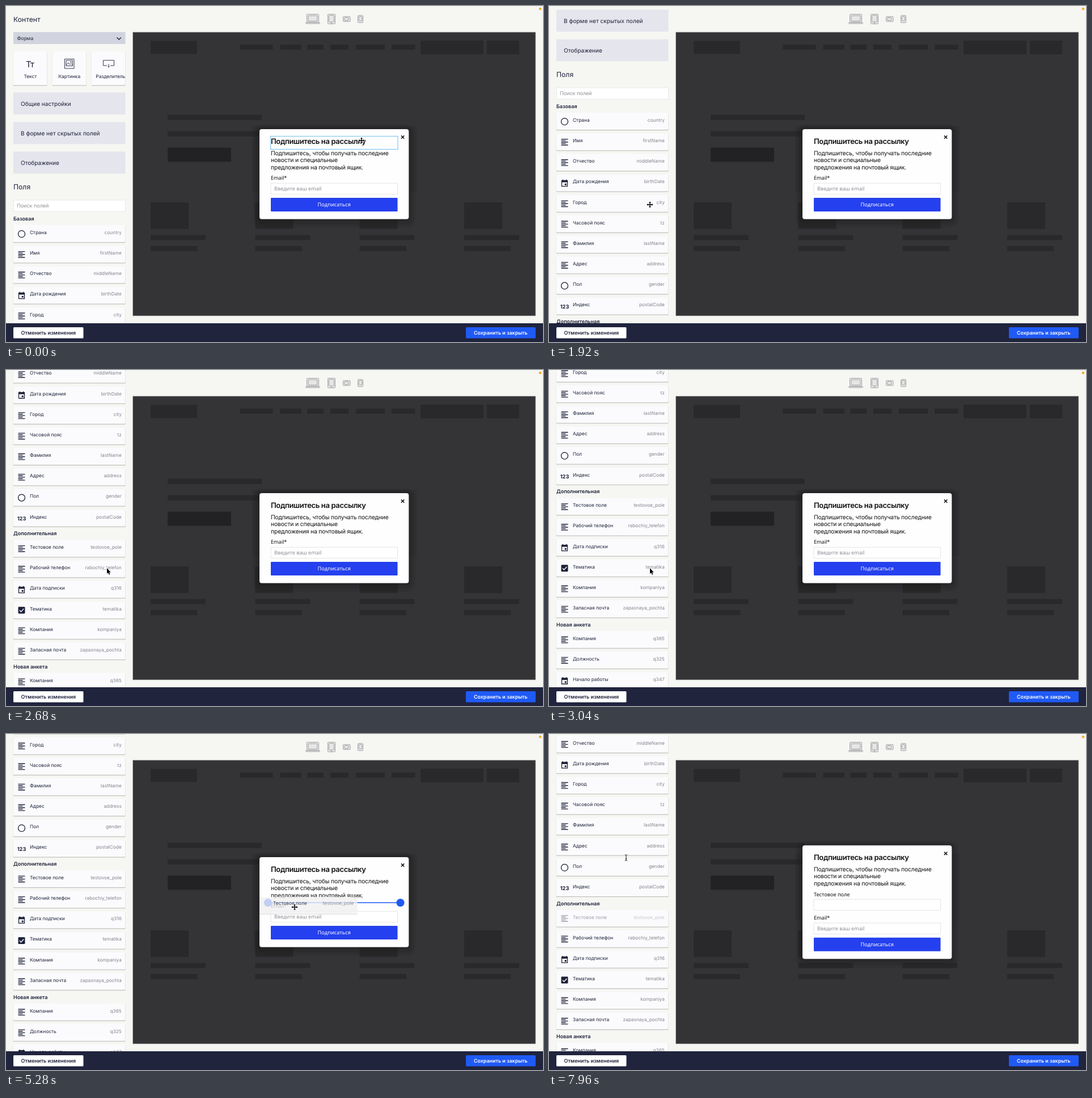
Animation of 947 by 592 pixels, one loop 8 s. Source, as an HTML page:

```html
<!DOCTYPE html>
<html lang="ru">
<head>
<meta charset="utf-8">
<style>
  html, body { margin: 0; width: 100%; height: 100%; overflow: hidden; background: #f6f6f3; }
  svg { display: block; width: 947px; height: 592px; font-family: Inter, "Noto Sans", sans-serif; text-rendering: geometricPrecision; }
  .noto { font-family: "Noto Sans", "Open Sans", sans-serif; }
</style>
</head>
<body>
<svg id="stage" viewBox="0 0 947 592" xmlns="http://www.w3.org/2000/svg"></svg>
<script>
const LOOP = 8000, STEP = 40, INK = '#1d2138';
const stage = document.getElementById('stage');

const rect = (x, y, w, h, fill, extra = '') =>
  `<rect x="${x}" y="${y}" width="${w}" height="${h}" fill="${fill}" ${extra}/>`;
const text = (x, y, size, str, fill = INK, extra = '') =>
  `<text x="${x}" y="${y}" font-size="${size}" fill="${fill}" ${extra}>${str}</text>`;
const line = (d, color = INK, width = 1.3, extra = '') =>
  `<path d="${d}" fill="none" stroke="${color}" stroke-width="${width}" ${extra}/>`;
const group = (id, body, extra = '') => `<g id="${id}" ${extra}>${body}</g>`;
const middle = 'text-anchor="middle"', end = 'text-anchor="end"', semi = 'font-weight="600"';

const panel = (x, y, w, h) =>
  rect(x - .5, y + .2, w + 1, h + 1.4, '#000', 'opacity=".07" rx="1.5"') +
  rect(x, y + 1, w, h, '#000', 'opacity=".17" rx="1"') +
  rect(x, y, w, h, '#fbfbfd', 'rx="1"');

// Field icons, centred on the origin
const icons = {
  lines: line('M-6-5.2H6M-6-2.6H2M-6 0H6M-6 2.6H2M-6 5.2H6', INK, 1.35),
  ring: `<circle r="6" fill="none" stroke="${INK}" stroke-width="1.3"/>`,
  date: line('M-5-4.5H5V5.5H-5Z', INK, 1.3) + rect(-5.5, -5.2, 11, 3.6, INK) +
        rect(-3.8, -6.5, 1.4, 2, INK) + rect(2.4, -6.5, 1.4, 2, INK) + rect(.2, .7, 3, 3, INK),
  check: rect(-6, -6, 12, 12, INK, 'rx="1.4"') + line('M-3.6 0L-1 2.7L3.8-2.6', '#fff', 1.4),
  digits: text(0, 3.8, 9.2, '123', INK, middle + ' font-weight="700"')
};

const sections = [
  ['Базовая', 374.8, [
    ['Страна', 'country', 'ring'], ['Имя', 'firstName'], ['Отчество', 'middleName'],
    ['Дата рождения', 'birthDate', 'date'], ['Город', 'city'], ['Часовой пояс', 'tz'],
    ['Фамилия', 'lastName'], ['Адрес', 'address'], ['Пол', 'gender', 'ring'],
    ['Индекс', 'postalCode', 'digits']]],
  ['Дополнительная', 753.8, [
    ['Тестовое поле', 'testovoe_pole'], ['Рабочий телефон', 'rabochiy_telefon'],
    ['Дата подписки', 'q316', 'date'], ['Тематика', 'tematika', 'check'],
    ['Компания', 'kompaniya'], ['Запасная почта', 'zapasnaya_pochta']]],
  ['Новая анкета', 988.4, [
    ['Компания', 'q365'], ['Должность', 'q325'], ['Начало работы', 'q347', 'date']]]
];

function fieldCard([name, code, icon = 'lines'], y) {
  const body = text(42, y + 3, 8.4, name) + text(203.8, y + 3, 8.3, code, '#83858f', end) +
    `<g transform="translate(27.5 ${y + 2.6})">${icons[icon]}</g>`;
  const id = code === 'testovoe_pole' ? 'id="usedField"' : '';
  return panel(13, y - 13, 197.5, 30) + `<g ${id}>${body}</g>`;
}

function sidebar() {
  const tiles = [13, 82, 151].map((x, i) => panel(x, 80, 59.5, 59.5) +
    text(x + (i === 2 ? 33.3 : 29.8), 127, 8.4, ['Текст', 'Картинка', 'Разделитель'][i], INK, middle)).join('');
  const tabs = ['Общие настройки', 'В форме нет скрытых полей', 'Отображение'].map((s, i) =>
    rect(13, 152.5 + i * 52, 197.5, 38.7, '#e5e5ed') + text(26, 175.8 + i * 52, 10.1, s)).join('');
  const fields = sections.map(([title, y, list]) => text(13, y + 3.2, 9, title, INK, semi) +
    list.map((f, i) => fieldCard(f, y + 24.2 + i * 36.16)).join('')).join('');
  return text(13, 27.6, 12.2, 'Контент') +
    rect(13, 46, 197.5, 21, '#d1d4de') + text(19.5, 59.8, 8.5, 'Форма') +
    line('M195.5 55.4l3.7 3.7l3.7-3.7', INK, 1.4) + tiles +
    text(42.5, 107.5, 15, 'Тт', INK, middle) +
    line('M103.5 93.5h16.5v16.5h-16.5ZM106 96h11.5v9.5H106ZM106.5 104l3.3-4l3 3l2-1.6l2.7 2.6', INK, .9) +
    `<circle cx="114.6" cy="98.8" r="1" fill="${INK}"/>` +
    line('M178 105h-6.5V95.7h19V105H184M181 102v6M179.5 106.5l1.5 1.5l1.5-1.5', INK, .9) +
    tabs + text(13, 323.2, 12.2, 'Поля') +
    rect(13.5, 342, 197, 20, '#fff', 'stroke="#e4e4e6" stroke-width=".8"') +
    text(19, 355.2, 9, 'Поиск полей', '#8e8f96') + fields;
}

function canvas() {
  const dim = (x, y, w, h, c = '#29292b') => rect(x, y, w, h, c);
  const nav = [[412.5, 58], [483.5, 37.5], [531.5, 28.5], [572, 32], [617, 51], [680, 41.5]];
  const columns = [255, 439.5, 623.5, 808];
  return rect(223.5, 46, 710.5, 500, '#343436', 'stroke="#b9c4bb" stroke-width=".8"') +
    dim(255, 61.5, 82, 23) + nav.map(([x, w]) => dim(x, 68, w, 9)).join('') +
    dim(731, 61, 111, 24) + dim(848, 61, 57, 24) +
    dim(434, 211, 291, 117, '#313133') +
    dim(285, 191.5, 166, 9.5) + dim(285, 220.5, 166, 9.5) + dim(285, 249.5, 112, 25, '#222224') +
    columns.map(x => dim(x, 346, 67, 47) + dim(x, 403.5, 96.7, 9) + dim(x, 423, 82.3, 9)).join('');
}

function devices() {
  const box = (x, y, w, h) => rect(x, y, w, h, '#e6e6e6', 'stroke="#a3a3a5" stroke-width="1" rx="1"');
  return box(530.5, 14.5, 21, 14) + box(533, 17, 16, 9.5) + box(528.5, 29, 25, 2) +
    box(567.5, 14.5, 13, 17) + box(569.5, 16.5, 9, 11.5) + rect(573, 29.2, 2, 1.4, '#a3a3a5') +
    box(594.5, 18.7, 12.5, 8.6) + box(596.8, 20.5, 7, 5) +
    box(620.5, 16.7, 9, 12.6) + box(622.3, 18.5, 5.4, 7.6);
}

function popup() {
  const label = (y, s) => text(467, y, 9.1, s, '#111', 'class="noto"');
  const input = y => rect(467, y, 223.5, 19.3, '#fff', 'stroke="#e5e5e8" stroke-width="1"');
  const lines = ['Подпишитесь, чтобы получать последние', 'новости и специальные', 'предложения на почтовый ящик.'];
  const shadow = [12, 9, 6, 3].map(m => `<rect class="frame" data-grow="${m}" rx="${m + 3}" fill="#000" opacity=".06"/>`).join('');
  return shadow + '<rect class="frame" data-grow="0" rx="4" fill="#fefefe"/>' +
    group('upper',
      text(467, 242.6, 13, 'Подпишитесь на рассылку', '#111', semi + ' letter-spacing="-.35"') +
      line('M696.9 228.4l5.4 5.4M702.3 228.4l-5.4 5.4', '#111', 1.5) +
      lines.map((s, i) => text(467, 262.6 + i * 12.5, 10.4, s, '#111', 'letter-spacing="-.17"')).join('')) +
    group('newField', label(285.8, 'Тестовое поле') + input(291.3)) +
    group('lower', label(306.3, 'Email*') + input(312.3) +
      text(473, 325.2, 9.1, 'Введите ваш email', '#8c8d95', 'class="noto"') +
      rect(467, 338, 223.5, 24, '#2540ee', 'rx="1"') +
      text(578.7, 353.4, 9.2, 'Подписаться', '#fff', middle + ' class="noto"'));
}

const arrows = 'M0-5.6L2-3.3H.7V-.7H3.3V-2L5.6 0L3.3 2V.7H.7V3.3H2L0 5.6L-2 3.3H-.7V.7H-3.3V2L-5.6 0L-3.3-2V-.7H-.7V-3.3H-2Z';
const outlined = (d, w) => `<path d="${d}" fill="#000" stroke="#fff" stroke-width="${w}" paint-order="stroke"/>`;
const ibeam = 'M-2.2-5.2Q-.4-5.2 0-4.2Q.4-5.2 2.2-5.2M0-4.4V4.4M-2.2 5.2Q-.4 5.2 0 4.2Q.4 5.2 2.2 5.2M-1.2 1.8H1.2';

stage.innerHTML =
  '<clipPath id="column"><rect x="11" y="0" width="200.2" height="559"/></clipPath>' +
  rect(0, 0, 947, 592, '#f6f6f3') +
  `<g clip-path="url(#column)">${group('list', sidebar())}</g>` +
  devices() + '<circle cx="942" cy="5" r="2.3" fill="#f7aa2d"/>' + canvas() + popup() +
  '<rect id="outline" x="466.5" width="224.5" fill="none" stroke="#86c8f2" stroke-width="1.2"/>' +
  group('drop', line('M462 0H695.5', '#205af5', 1.6) +
    '<circle cx="462" r="7" fill="#205af5"/><circle cx="695.5" r="7" fill="#205af5"/>') +
  group('ghost', rect(0, 1, 173, 30, '#000', 'opacity=".12"') + rect(0, 0, 173, 30, '#fbfbfd', 'opacity=".74"') +
    text(24, 14.3, 8.4, 'Тестовое поле', INK, 'opacity=".85"') +
    text(166, 14.3, 8.3, 'testovoe_pole', '#83858f', end + ' opacity=".85"')) +
  rect(0, 559, 947, 33, '#20243d') +
  rect(13, 566, 123.5, 19.5, '#fff', 'rx="1.5"') + text(74.8, 579.2, 9, 'Отменить изменения', INK, middle + ' ' + semi) +
  rect(811, 566, 123, 19.5, '#205af5', 'rx="1.5"') + text(872.4, 579.2, 8.9, 'Сохранить и закрыть', '#fff', middle + ' ' + semi) +
  group('cursor', group('move', outlined(arrows, 1.4)) +
    group('arrow', outlined('M0-1V9L2.2 7.1L3.8 10.8L5.4 10.1L3.8 6.5H6.8Z', 1.4)) +
    group('beam', line(ibeam, '#fff', 2.2, 'opacity=".8"') + line(ibeam, '#111', 1)));

const el = id => document.getElementById(id);
const frames = [...document.querySelectorAll('.frame')];
const show = (id, on) => { el(id).style.display = on ? '' : 'none'; };
const place = (id, x, y) => el(id).setAttribute('transform', `translate(${x} ${y})`);
const clamp = v => Math.max(0, Math.min(1, v));
const easeOut = p => 1 - (1 - p) ** 3;

// [start, end, distance, easing]
const scrolls = [
  [1560, 2240, 221, easeOut],
  [2360, 3200, 321, easeOut],
  [3200, 3440, -17, easeOut],
  [7800, 7960, -69.5, p => p ** 1.5]
];
const scrollAt = t => scrolls.reduce((sum, [a, b, d, ease]) => sum + d * ease(clamp((t - a) / (b - a))), 0);

// [time, x, y]
const path = [
  [560, 627, 237], [680, 600, 272], [800, 530, 335], [900, 450, 366], [1000, 345, 373], [1120, 235, 364],
  [1200, 192, 354], [1280, 178, 350], [3960, 178, 350], [4080, 160, 327], [4240, 112, 275], [4400, 93, 258],
  [4640, 93, 258], [4760, 138, 249], [4920, 265, 280], [5080, 420, 314], [5280, 509, 305], [5440, 544, 301],
  [7160, 544, 301], [7280, 478, 289], [7440, 280, 250], [7560, 172, 226], [7680, 136, 218]
];
function cursorAt(t) {
  const i = path.findIndex(k => k[0] > t);
  if (i === 0) return path[0].slice(1);
  if (i < 0) return path[path.length - 1].slice(1);
  const [a, ax, ay] = path[i - 1], [b, bx, by] = path[i], p = (t - a) / (b - a);
  return [ax + (bx - ax) * p, ay + (by - ay) * p];
}

const blocks = [[229.5, 252.5], [252.5, 291.5], [296, 338], [338, 362]];
const fieldBlock = [[275.5, 318]];
function hovered(t, x, y) {
  if (x < 466 || x > 691 || (t > 4600 && t < 5880)) return null;
  return (t < 5840 ? blocks : fieldBlock).find(([top, bottom]) => y >= top && y < bottom);
}

function cursorKind(t, block) {
  if (block) return 'move';
  if (t < 1240) return 'arrow';
  if (t < 1640) return 'beam';
  if (t < 2400) return 'move';
  if (t < 3400) return 'arrow';
  if (t < 7200) return 'move';
  return t < 7920 ? 'arrow' : 'beam';
}

function render(t) {
  const added = t >= 5840, shift = added ? 20.7 : 0;
  const [x, y] = cursorAt(t), block = hovered(t, x, y), kind = cursorKind(t, block);

  place('list', 0, -scrollAt(t));
  el('usedField').setAttribute('opacity', added ? .42 : 1);

  for (const f of frames) {
    const m = +f.dataset.grow;
    f.setAttribute('x', 447 - m);
    f.setAttribute('y', 217 - shift - m + m / 3);
    f.setAttribute('width', 263.3 + 2 * m);
    f.setAttribute('height', 158.5 + 2 * shift + 2 * m);
  }
  place('upper', 0, -shift);
  place('lower', 0, shift);
  show('newField', added);

  show('outline', !!block);
  if (block) {
    el('outline').setAttribute('y', block[0]);
    el('outline').setAttribute('height', block[1] - block[0]);
  }

  show('drop', t >= 5120 && t < 5840);
  place('drop', 0, t < 5640 ? 297.2 : 338.5);
  show('ghost', t >= 4760 && t < 5640);
  place('ghost', x - 62, y - 18);

  place('cursor', x, y);
  for (const k of ['move', 'arrow', 'beam']) show(k, k === kind);
}

function tick() {
  render(Math.floor(performance.now() % LOOP / STEP) * STEP);
  requestAnimationFrame(tick);
}
tick();
</script>
</body>
</html>
```
